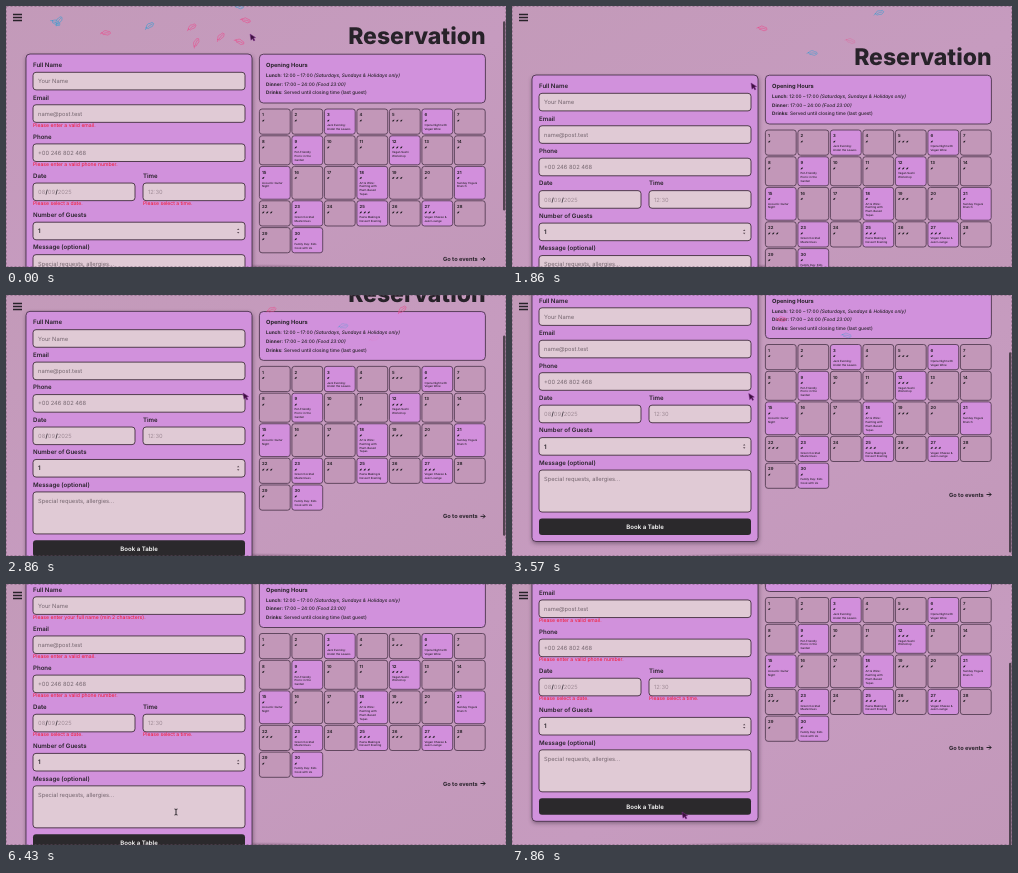
These frames come from a looping animation (500x261 px, 8 s). An HTML page:

```html
<!DOCTYPE html>
<html lang="en">
<head>
<meta charset="utf-8">
<title>Reservation</title>
<style>
  html, body { margin: 0; width: 100%; height: 100%; overflow: hidden; background: #c39abb; }
  svg { display: block; width: 100%; height: 100%; }
  text { font-family: Inter, "Open Sans", sans-serif; fill: #272229; text-rendering: geometricPrecision; white-space: pre; }
  .title { font-size: 23px; font-weight: 800; text-anchor: end; }
  .label { font-size: 6.1px; font-weight: 600; }
  .small { font-size: 5.7px; font-weight: 700; }
  .hint { font-size: 5.75px; fill: #75666f; }
  .faint { fill: #a08c97; }
  .slash { fill: #272229; font-weight: 700; }
  .error { font-size: 5.1px; fill: #f5142d; }
  .hours { font-size: 4.75px; font-weight: 500; }
  .hours .b { font-weight: 700; }
  .hours .i { font-style: italic; }
  .day { font-size: 4.2px; font-weight: 700; }
  .event { font-size: 2.8px; font-weight: 500; }
  .box { fill: #e0cad5; stroke: #43303f; stroke-width: .9; }
  .panel { fill: #d191dc; stroke: #3b293d; stroke-width: .8; }
  .cell { fill: #c297b8; stroke: #4a3449; stroke-width: .8; }
  .cell.on { fill: #d28fdc; }
  .button { fill: #2b292c; }
  .petal { fill: none; stroke-width: .8; stroke-linecap: round; }
</style>
</head>
<body>
<svg id="stage" viewBox="0 0 500 261"></svg>
<script>
const LOOP = 8000, STEP = 142.9;
const RELOAD = 285, SUBMIT = 6280, LEAVE_TEXTAREA = 7780;
const ERROR_HEIGHT = 6.7, PITCH = 32.45;
const stage = document.getElementById('stage');
const $ = id => document.getElementById(id);

const text = (x, y, cls, str, extra = '') => `<text x="${x}" y="${y}" class="${cls}" ${extra}>${str}</text>`;
const rect = (x, y, w, h, cls, r = 3, extra = '') =>
  `<rect x="${x}" y="${y}" width="${w}" height="${h}" rx="${r}" class="${cls}" ${extra}/>`;

// Form
function field(row, label, hint, error, { x = 27, w = 212, h = 17.6, cls = 'hint' } = {}) {
  const y = 80 + row * PITCH;
  return text(x, y + 2.1, 'label', label) + rect(x, y + 7.3, w, h, 'box') +
    text(x + 5, y + 18.2, cls, hint) +
    (error ? `<g class="err">${text(x, y + 29.1, 'error', error)}</g>` : '');
}
const date = ['08', '09', '2025'].join('<tspan class="slash" dx=".4">/</tspan>');
const rows = [
  field(0, 'Full Name', 'Your Name', 'Please enter your full name (min 2 characters).'),
  field(1, 'Email', 'name@post.test', 'Please enter a valid email.'),
  field(2, 'Phone', '+00 246 802 468', 'Please enter a valid phone number.'),
  field(3, 'Date', date, 'Please select a date.', { w: 102, cls: 'hint faint' }) +
    field(3, 'Time', '12:30', 'Please select a time.', { x: 137, w: 102, cls: 'hint faint' }),
  field(4, 'Number of Guests', '1', '', { cls: 'label' }) +
    '<path d="M231 225l1.2-1.5 1.2 1.5zM231 226.8l1.2 1.5 1.2-1.5z" fill="#594853"/>' +
    field(5, 'Message (optional)', 'Special requests, allergies...', '', { h: 42 }) +
    rect(27, 298, 212, 16.4, 'button') +
    text(133, 308.3, 'label', 'Book a Table', 'text-anchor="middle" style="fill:#fff"')
];

// Calendar: each week is as tall as its longest event
const events = {
  3: 'Jazz Evening:|Under the Leaves', 6: 'Opera Night with|Vegan Wine',
  9: 'Pet-Friendly|Picnic in the|Garden', 12: 'Vegan Sushi|Workshop',
  15: 'Acoustic Guitar|Night', 18: 'Art &amp; Wine:|Painting with|Plant-Based|Tapas',
  21: 'Sunday Yoga &amp;|Brunch', 23: 'Green Cocktail|Masterclass',
  25: 'Pasta Making &amp;|Dessert Evening', 27: 'Vegan Cheese &amp;|Jazz Lounge',
  30: 'Family Day: Kids|Cook with Us'
};
const linesOf = day => (events[day] || '').split('|');
const hasThreeIcons = day => day % 7 === 5 || [22, 25, 27].includes(day);

function dayCell(day, x, y, height) {
  const icons = hasThreeIcons(day) ? [0, 4, 8] : [0];
  return rect(x, y, 30.8, height, events[day] ? 'cell on' : 'cell', 2.6) +
    text(x + 2.6, y + 7.2, 'day', day) +
    icons.map(dx => `<path d="M${x + 2.7 + dx} ${y + 12.6}q-.1-2 2.3-2.2q.1 2.3-2.3 2.2z" fill="#272229"/>`).join('') +
    linesOf(day).map((line, i) => text(x + 2.6, y + 17.2 + i * 3.8, 'event', line)).join('');
}
let calendar = '';
for (let first = 1, y = 124; first <= 30; first += 7) {
  const days = Array.from({ length: Math.min(7, 31 - first) }, (_, i) => first + i);
  const height = 25.2 + 3.8 * (Math.max(2, ...days.map(d => linesOf(d).length)) - 2);
  calendar += days.map((d, i) => dayCell(d, 253.4 + i * 32.5, y, height)).join('');
  y += height + 1.6;
}
calendar += text(437, 276, 'small', 'Go to events') +
  '<path d="M474.5 274h4.6m-2-2l2 2-2 2" fill="none" stroke="#272229"/>';

const hoursText = [
  ['Lunch', '12:00 – 17:00', '(Saturdays, Sundays &amp; Holidays only)'],
  ['Dinner', '17:00 – 24:00', '(Food 23:00)'],
  ['Drinks', 'Served until closing time (last guest)', '']
];
const hours = rect(253.4, 69.2, 226, 48.8, 'panel', 4) + text(260, 82, 'small', 'Opening Hours') +
  hoursText.map(([name, value, note], i) => text(260, 92 + i * 8.6, 'hours',
    `<tspan class="b">${name}:</tspan> ${value} <tspan class="i">${note}</tspan>`)).join('');

// Petals: one batch before the reload, then a shower that thins out
let seed = 11;
const random = () => (seed = seed * 16807 % 2147483647) / 2147483647;
const between = (a, b) => a + (b - a) * random();
const petals = Array.from({ length: 30 }, (_, i) => {
  const early = i < 10;
  const born = early ? -300 : 430 + 5500 * random() ** 2;
  return {
    born, dies: early ? RELOAD : born + between(900, 2000),
    x: early ? between(50, 280) : between(230, 450), y: between(0, 38),
    vx: between(-6, 6), vy: between(8, 16), angle: between(-50, 60),
    color: i % 5 < 2 ? '#3d9cd0' : '#e8508f', opacity: born < 2500 ? .8 : .45
  };
});
const petalShape = 'M-5 1Q-3-4 1-2.5Q4-4 5-1Q3 3-1 2Q-3 4-5 1ZM-3 1Q0-1 3-1M-5 1l-1.5 1.6';

stage.innerHTML = `
  <defs>
    <linearGradient id="sky" x2="1" y2="1">
      <stop stop-color="#c39ab9"/><stop offset=".55" stop-color="#c69bbf"/><stop offset="1" stop-color="#c298b9"/>
    </linearGradient>
    <radialGradient id="shade"><stop stop-color="#51384f" stop-opacity=".5"/><stop offset="1" stop-color="#51384f" stop-opacity="0"/></radialGradient>
    <filter id="soft"><feGaussianBlur stdDeviation="2"/></filter>
  </defs>
  <rect width="500" height="261" fill="url(#sky)"/>
  <ellipse cx="246" cy="262" rx="100" ry="4" fill="url(#shade)"/>
  <g id="page">
    <g id="title">${text(479.5, 59.2, 'title', 'Reservation')}</g>
    <g id="form">
      ${rect(20, 71, 227, 252, '', 4, 'fill="#3b293d" opacity=".5" filter="url(#soft)"')}
      ${rect(20, 69, 226, 252, 'panel', 4)}
      ${rows.map(r => `<g class="row">${r}</g>`).join('')}
    </g>
    <g id="hours">${hours}</g>
    <g id="calendar">${calendar}</g>
  </g>
  <g id="petals">${petals.map(p => `<path class="petal" d="${petalShape}" stroke="${p.color}"/>`).join('')}</g>
  <path d="M7 8.4h9M7 11.4h9M7 14.4h9" stroke="#272229" stroke-width="1.5"/>
  <rect x=".5" y=".5" width="499" height="260" fill="none" stroke="#6b5068" stroke-width=".7" stroke-dasharray="2 2" opacity=".65"/>
  <rect id="thumb" x="497" width="2.4" rx="1.2" fill="#514350"/>
  <path id="arrow" d="M0 0l1 6.2 1.5-1.5 1.3 2.3 1.1-.7-1.3-2.2 2-.5z" fill="#3d123f" stroke="#7d2f8b" stroke-width=".5"/>
  <path id="beam" d="M-1.5-3q1.5 0 1.5 1q0-1 1.5-1M0-2v4M-1.5 3q1.5 0 1.5-1q0 1 1.5 1" fill="none" stroke="#1f1a20" stroke-width=".9"/>`;

const rowEls = [...stage.querySelectorAll('.row')];
const panelEls = stage.querySelectorAll('#form > rect');
const petalEls = [...$('petals').children];

const ramp = (t, from, to) => Math.max(0, Math.min(1, (t - from) / (to - from)));
const ease = (t, from, to) => { const p = ramp(t, from, to); return p * p * (3 - 2 * p); };
const move = (el, x, y, rest = '') => el.setAttribute('transform', `translate(${x} ${y})${rest}`);
const show = (el, on) => el.setAttribute('visibility', on ? 'visible' : 'hidden');

const scrollAt = t => 21 * (1 - ramp(t, 0, RELOAD)) + 74.5 * ease(t, 2300, 3170) + 36 * ease(t, 7290, 7858);

// Pointer moves: start, end, dx, dy
const moves = [[1150, 1860, -5, 49], [2000, 2860, -2, 21], [3500, 5290, -55, 103], [5300, 5900, -12, 27]];
const cursorAt = t => moves.reduce(([x, y], [from, to, dx, dy]) => {
  const p = ease(t, from, to);
  return [x + dx * p, y + dy * p];
}, [244, 28]);

// Each block slides in and fades after the page reloads
function enter(id, t, start, duration, distance) {
  const left = t < RELOAD ? 0 : (1 - ramp(t, start, start + duration)) ** 2;
  move($(id), 0, distance * left);
  $(id).setAttribute('opacity', 1 - left);
}

function render(t) {
  const scroll = scrollAt(t);
  let shift = 0;
  rowEls.forEach((row, i) => {
    const errors = row.querySelectorAll('.err');
    const invalid = errors.length > 0 && (t > SUBMIT || t < RELOAD && i > 0);
    move(row, 0, shift);
    errors.forEach(e => show(e, invalid));
    if (invalid) shift += ERROR_HEIGHT;
  });
  panelEls.forEach(p => p.setAttribute('height', 252 + shift));
  move($('page'), 0, -scroll);
  enter('title', t, 200, 700, -26);
  enter('form', t, 250, 560, 30);
  enter('hours', t, 430, 800, 17);
  enter('calendar', t, 430, 800, 17);

  const pageHeight = 340 + shift;
  $('thumb').setAttribute('y', 261 * scroll / pageHeight);
  $('thumb').setAttribute('height', 261 * 261 / pageHeight);
  show($('thumb'), scroll > 0 && (t < 5650 || t > 7300));

  petals.forEach((p, i) => {
    const age = (t - Math.max(0, p.born)) / 1000;
    move(petalEls[i], p.x + p.vx * age, p.y + p.vy * age, ` rotate(${p.angle + age * 25}) scale(.85)`);
    petalEls[i].setAttribute('opacity', p.opacity * ramp(t, p.born, p.born + 200) * ramp(t, p.dies, p.dies - 200));
  });

  const [x, y] = cursorAt(t), overText = t > SUBMIT && t < LEAVE_TEXTAREA;
  move($('arrow'), x, y);
  move($('beam'), x, y);
  show($('arrow'), !overText);
  show($('beam'), overText);
}

const began = performance.now();
function tick() {
  const t = (performance.now() - began) % LOOP;
  render(Math.min(55, Math.floor((t + 8) / STEP)) * STEP);
  requestAnimationFrame(tick);
}
tick();
</script>
</body>
</html>
```
